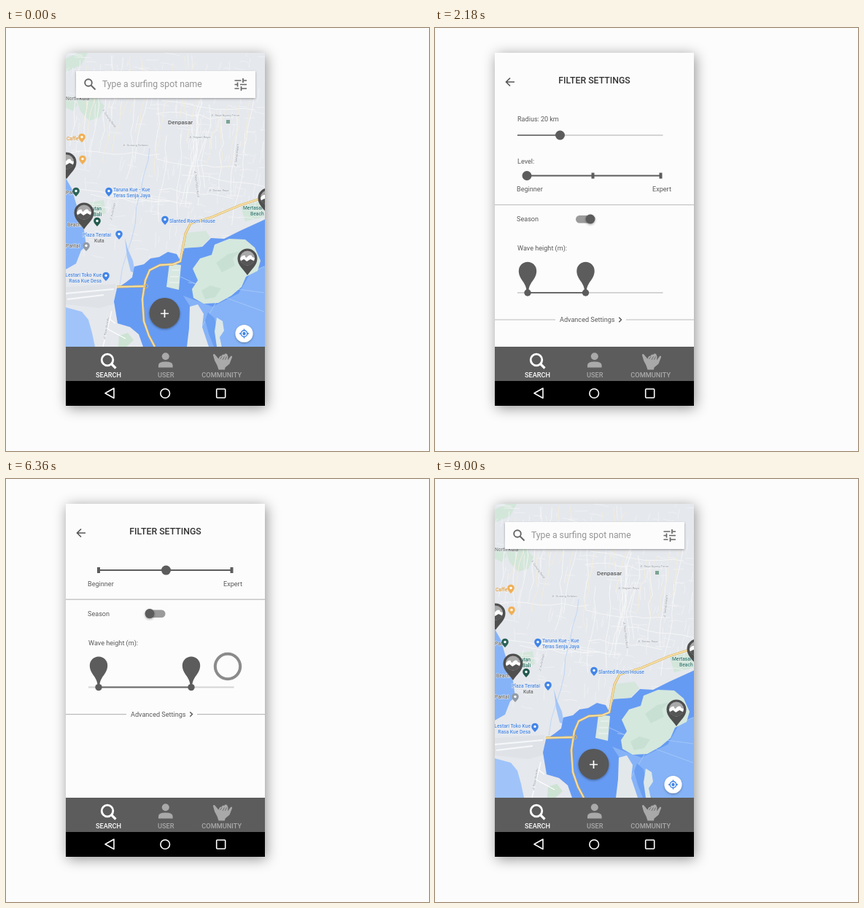
Recreate the animation shown at these times as an HTML page. Size 580 by 580 pixels, loop 10000 ms.

```html
<!DOCTYPE html>
<html lang="en">
<head>
<meta charset="utf-8">
<title>Surf spot filter</title>
<style>
  html, body { margin: 0; width: 100%; height: 100%; overflow: hidden; background: #fcfcfc; }
  body { position: relative; font-family: Roboto, sans-serif; }
  svg { display: block; position: absolute; left: 0; top: 0; }
  text { font-family: Roboto, sans-serif; }
  .phone { position: absolute; left: 82px; top: 34px; width: 272.5px; height: 484px;
    background: #000; box-shadow: 2px 3px 17px rgba(0, 0, 0, .42); }
  .view { position: absolute; left: 0; top: 0; width: 272.5px; height: 403px; overflow: hidden; }
  #panel { position: absolute; left: 0; top: 0; width: 272.5px; height: 484px;
    background: #fcfcfc; transform-origin: 136.25px 252px; }
  .label { font-size: 9.1px; fill: #5a5a5a; }
  .poi { font-size: 6.7px; font-weight: 500; fill: #4c89e2; }
  .place { font-size: 6.7px; font-weight: 500; fill: #666; }
  .street { font-size: 4.2px; fill: #9a9da2; }
  .halo text { paint-order: stroke; stroke: #eef1f5; stroke-width: 1.2px; }
  .nav { font-size: 9.2px; font-weight: 500; text-anchor: middle; }
</style>
</head>
<body>
<div class="phone">
  <div class="view">
    <svg id="map" width="272.5" height="403" viewBox="82 34 272.5 403">
      <defs>
        <filter id="soft" x="-20%" y="-40%" width="140%" height="190%">
          <feDropShadow dx="0" dy="1.2" stdDeviation="1.6" flood-opacity=".35"/>
        </filter>
        <g id="spot">
          <path d="M-13.500 -23a13.500 13.500 0 1 1 27 0C13.500 -13 5 -8 0 0C-5 -8 -13.500 -13 -13.500 -23z" fill="#4f4f4f"/>
          <circle cy="-23.500" r="10" fill="#a9a9a9"/>
          <path d="M-10 -23q3-5 7-4q-1 2 2 3q3-5 7-3q-1 2 4 3q-1 9-10 10.500q-9-1.500-10-9.500z" fill="#fff"/>
          <path d="M-9.300 -19.500l4.500-2.500 4 3 5-3 5 2.500q-3 6-9.200 6.200q-6.300-.2-9.300-6.200z" fill="#565656"/>
        </g>
      </defs>
      <rect x="82" y="34" width="273" height="403" fill="#e5e8ed"/>
      <g fill="#d3e6da">
        <path d="M82 42l16-8h14l-9 17-21 9zM97 98l28-3 10 12-7 16-14 4-12-13zM82 94h8l8 11-6 9-10-5z"/>
        <path d="M110 240l24-4 3 18-20 6zM322 245l32-9v23l-26 6z"/>
      </g>
      <g id="roads" fill="none"></g>
      <path d="M82 355l68-4v27l-22 6-46-5z" fill="#dfe3e8"/>
      <path d="M82 364l66-6M84 372l50-6" stroke="#f6f7f9" stroke-width="2"/>
      <path d="M82 206l8 14 8 27 9 30 3 22-7 6-7 18-14 8z" fill="#86b3f7"/>
      <path d="M82 383l22 6 9 11 5 18 4 19H82z" fill="#a0c4fa"/>
      <path d="M163 288l4 15 7 16 3 17-6-2-5-20z" fill="#a3c5f8"/>
      <path d="M148 375l4-18 12-8 9-7 3-15 13-3 9-8 12-2 12-7 12 3 5 9 6-18 24-1 12-12 18 1 22-11 35-16v175H188l-6-17-12-10-17-5z" fill="#669bf3"/>
      <path d="M243 367l40 15 36-18 16-28 20-10v111h-79l-20-50z" fill="#86b3f7"/>
      <path d="M239 341l60 28 55 20M250 349l104 14M253 437l50-87 51-23" fill="none" stroke="#a9caf9" stroke-width=".8"/>
      <path d="M247 281l27-3 6 9-12 13-24 2z" fill="#d5e6dc"/>
      <path d="M256 330l10-14 16-5 4-14 20-8 22 1 13 11 8 18-4 14-16 8-6 14-14 12-18 10-20 1-14-8-2-12 8-12z" fill="#d5e8de"/>
      <path d="M288 322l16-12 17-4-10 10 3 10-18 9zM268 360l12-7 15 4-8 12-14 3z" fill="#c6dfd2" opacity=".8"/>
      <path d="M224 323l16 2-3 34-17-4z" fill="#d8e8e1"/>
      <path d="M227 332h11M225 341h12M224 349h13" stroke="#f1f5f3"/>
      <path d="M252 382l11-3 8 13-2 18 9 27h-30l3-25z" fill="#e3e8eb"/>
      <path d="M277 390l9 8 4 20 7 19h-12l-7-18-5-18z" fill="#6a9ff1"/>
      <path d="M289 397l8 5 2 13-6 9 3 13h-7l-3-21z" fill="#dbe7e9"/>
      <path d="M155 422l12-4 8 10-10 9h-11z" fill="#cde3d3"/>
      <path d="M133 437l12-49M138 412l26 14M142 399l8 6" stroke="#fff" stroke-width="1.2" fill="none"/>
      <g fill="none" stroke-linejoin="round">
        <path id="highway" d="M355 232l-34 11-24 10-14 6-30 9-7 14-7 38-10 4-18 1-14 7-6 14-4 26 2 30 7 20 8 15M152 355l39-1" stroke="#dcb766" stroke-width="2.800"/>
        <use href="#highway" style="stroke:#fbe6b0;stroke-width:1.4"/>
      </g>
      <path d="M355 232l-34 11-24 10-14 6-30 9-7 14-7 38-10 4-18 1-14 7-6 14-4 26 2 30 7 20 8 15M152 355l39-1" fill="none" stroke="#fbe6b0" stroke-width="1.400"/>
      <circle cx="192" cy="354" r="2.600" fill="none" stroke="#e0b258"/>
      <g class="halo">
        <text x="222" y="132" font-size="8" font-weight="500" fill="#555">Denpasar</text>
        <g class="poi">
          <text x="147" y="224">Taruna Kue - Kue</text><text x="147" y="232">Teras Senja Jaya</text>
          <text x="224" y="267">Slanted Room House</text>
          <text x="105" y="286">Plaza Teratai</text>
          <text x="131" y="341" text-anchor="end">Lestari Toko Kue</text>
          <text x="131" y="349" text-anchor="end">Rasa Kue Desa</text>
        </g>
        <g class="place">
          <text x="82" y="99" font-weight="400">North Kuta</text>
          <text x="121" y="294">Kuta</text>
          <text x="113" y="250" fill="#2d7866">Hutan</text><text x="120" y="258" fill="#2d7866">Bali</text>
          <text x="84" y="272">Beach</text><text x="82" y="301">Pantai</text><text x="82" y="228">Park</text>
          <text x="325" y="249" fill="#2d7866">Mertasari</text><text x="335" y="257" fill="#2d7866">Beach</text>
          <text x="83" y="154" fill="#e29a35">Caffe</text>
        </g>
        <g class="street">
          <text x="281" y="121">Jl. Raya Agung Timur</text>
          <text x="160" y="162">Jl. Gunung Selatan</text><text x="251" y="151">Jl. Hayam Raya</text>
          <text x="278" y="224">Jl. Danau Raya</text>
          <text transform="translate(316 190)rotate(-84)">Jl. Sedap Malam</text>
          <text transform="translate(258 196)rotate(83)">Jl. Raya Pulau Kecil</text>
          <text transform="translate(131 112)rotate(54)">Jl. Gunung Barat</text>
          <text transform="translate(136 427)rotate(-80)">Jl. Raya Uluwatu</text>
          <text transform="translate(145 264)rotate(-78)">Jl. Kuta Raya</text>
        </g>
      </g>
      <g id="places"></g>
      <rect x="302" y="126" width="5" height="5" fill="#7ba492"/>
      <use href="#spot" x="331" y="339"/><use href="#spot" x="107" y="276"/>
      <use href="#spot" x="83" y="207"/><use href="#spot" x="359" y="256"/>
      <circle cx="217.500" cy="391" r="21" fill="#585858" filter="url(#soft)"/>
      <path d="M212 391.500h11M217.500 386v11" stroke="#fff" stroke-width="1.700"/>
      <circle cx="326.500" cy="419" r="12" fill="#fff" filter="url(#soft)"/>
      <g fill="none" stroke="#4285e8" stroke-width="1.400">
        <circle cx="326.500" cy="419" r="4.300"/><circle cx="326.500" cy="419" r="1.500" fill="#4285e8"/>
        <path d="M326.500 412.500v2.500M326.500 423v2.500M320 419h2.500M330.500 419h2.500"/>
      </g>
      <rect x="96" y="59" width="246" height="37" fill="#fcfcfc" filter="url(#soft)"/>
      <g fill="none" stroke="#666" stroke-width="1.900">
        <circle cx="113" cy="75" r="4.800"/><path d="M116.500 78.500l6 6"/>
        <path stroke-width="1.700" d="M313.500 72h9M326 72h4M313.500 77.500h4M321 77.500h9M313.500 83h6M323 83h7M325 69v6M317.500 74.500v6M322.500 80v6"/>
      </g>
      <text x="132" y="81" font-size="12.200" fill="#949494">Type a surfing spot name</text>
      <rect id="dim" x="82" y="34" width="273" height="403"/>
    </svg>
    <div id="panel">
      <svg width="272.5" height="484" viewBox="82 34 272.5 484">
        <defs>
          <clipPath id="body"><rect x="82" y="110" width="273" height="408"/></clipPath>
          <g id="drop" fill="#5c5c5c">
            <path d="M-12.200-30a12.200 12.200 0 1 1 24.400 0C12.200-18 2-15 1.300-2h-2.600C-2-15-12.200-18-12.200-30z"/>
            <circle r="4.700"/>
          </g>
        </defs>
        <path d="M109 74h-11M103 68.500l-5.500 5.500 5.500 5.500" fill="none" stroke="#555" stroke-width="1.600"/>
        <text x="218.500" y="76" font-size="12.300" font-weight="500" fill="#333" text-anchor="middle">FILTER SETTINGS</text>
        <g clip-path="url(#body)"><g id="content">
          <g class="label">
            <text x="113" y="127.500">Radius:</text>
            <text id="km" x="145" y="127.500"></text><text x="157.200" y="127.500">km</text>
            <text x="113" y="186">Level:</text>
            <text x="112" y="224">Beginner</text><text x="298" y="224">Expert</text>
            <text x="112" y="265">Season</text>
            <text x="113" y="305">Wave height (m):</text>
            <text x="171" y="403">Advanced Settings</text>
          </g>
          <g stroke-width="2">
            <path d="M113 147h199.500M113 363h199.500" stroke="#d4d4d4"/>
            <line id="radiusLine" x1="113" y1="147" y2="147" stroke="#7c7c7c"/>
            <line id="waveLine" x1="127" y1="363" y2="363" stroke="#6a6a6a"/>
            <path d="M126 202.500h184" stroke="#5c5c5c"/>
          </g>
          <path d="M125 198.500h4v8h-4zM214.500 198.500h4v8h-4zM307.500 198.500h4v8h-4z" fill="#5c5c5c"/>
          <path d="M82 242.500h273M82 400h83M262 400h93" stroke="#bcbcbc" stroke-width="1.200"/>
          <circle id="radiusKnob" cy="147" r="6.500" fill="#5c5c5c"/>
          <circle id="levelKnob" cy="202.500" r="6.500" fill="#5c5c5c"/>
          <rect x="193" y="257" width="25.500" height="10.500" rx="5.200" fill="#9b9b9b"/>
          <circle id="season" cy="262" r="6.500" fill="#5c5c5c" filter="url(#soft)"/>
          <use href="#drop" x="127" y="363"/><use id="pin" href="#drop" y="363"/>
          <path id="arrow" d="M252.300 396.800l3.200 3.200-3.200 3.200" fill="none" stroke="#555" stroke-width="1.400"/>
          <g id="more">
            <rect x="112" y="440" width="174" height="24.500" rx="1.500" fill="#fff" filter="url(#soft)"/>
            <text x="120.500" y="456" font-size="10" font-weight="500" fill="#4a4a4a" letter-spacing=".1">Beachbreak</text>
            <path d="M268.700 451.800l3.200 3.200 3.200-3.200" fill="none" stroke="#444" stroke-width="1.500"/>
            <text class="label" x="113" y="512.500">Only Onshore Swell</text>
            <rect x="212" y="504.500" width="25" height="10.500" rx="5.200" fill="#9b9b9b"/>
            <circle cx="216.500" cy="509.700" r="6.500" fill="#5c5c5c" filter="url(#soft)"/>
            <text class="label" x="113" y="551.500">Tide:</text>
          </g>
        </g></g>
      </svg>
    </div>
    <svg width="272.5" height="403" viewBox="82 34 272.5 403">
      <path id="tap" fill="#5c5c5c" fill-rule="evenodd"/>
    </svg>
  </div>
  <svg width="272.5" height="484" viewBox="82 34 272.5 484">
    <rect x="82" y="437" width="273" height="47" fill="#5c5c5c"/>
    <rect x="82" y="484" width="273" height="35"/>
    <circle cx="139" cy="455" r="7.800" fill="none" stroke="#fff" stroke-width="2.800"/>
    <path d="M144.500 460.500l6 6" stroke="#fff" stroke-width="3.200"/>
    <g fill="#a9a9a9">
      <circle cx="218.800" cy="450.300" r="5"/>
      <path d="M209 465.500v-3q0-5 9.800-5t9.800 5v3z"/>
      <path d="M283.800 448q1.500-2 3 0l4.500 5.500 2-3.500 2.500-.5 1-1.800 2.600 0 1-1.200 2.600.3 1.600 4-.6 4.700 4-5.500q2-1.500 2.200 1l-3.700 9.500-6 5-.5 3h-8.500l-2-6q-4-6-5.700-14.500z"/>
    </g>
    <path d="M293.500 454l2.500-3.500M297 455l2.500-4.500M300.500 455l2-4.500" stroke="#5c5c5c" stroke-width=".8"/>
    <g class="nav" fill="#a9a9a9">
      <text x="140.500" y="479" fill="#fff">SEARCH</text>
      <text x="219.300" y="479">USER</text>
      <text x="295.700" y="479">COMMUNITY</text>
    </g>
    <g fill="none" stroke="#fff" stroke-width="1.600" stroke-linejoin="round">
      <path d="M148 494v13.500l-12-6.700z"/><circle cx="218.200" cy="501" r="6.300"/>
      <rect x="288.700" y="495" width="12" height="12" rx="1"/>
    </g>
  </svg>
</div>
<script>
const el = id => document.getElementById(id);
const set = (id, attrs) => { for (const k in attrs) el(id).setAttribute(k, attrs[k]); };
const mix = (a, b, p) => a + (b - a) * p;
const ramp = (t, a, b) => Math.min(1, Math.max(0, (t - a) / (b - a)));
const easeOut = p => 1 - (1 - p) ** 3;
const easeInOut = p => (1 - Math.cos(Math.PI * p)) / 2;

let seed = 11;
const rnd = () => (seed = seed * 16807 % 2147483647) / 2147483647;

// Street net: wandering main roads plus short side streets
function road(x, y, dx, dy, n, wander, color, width) {
  let d = `M${x} ${y}`;
  for (let i = 0; i < n; i++)
    d += `l${(dx + (rnd() - .5) * wander).toFixed(1)} ${(dy + (rnd() - .5) * wander).toFixed(1)}`;
  return `<path d="${d}" stroke="${color}" stroke-width="${width}"/>`;
}
function drawRoads() {
  let out = '';
  for (let i = 0; i < 300; i++) {
    const len = 3 + rnd() * 8, up = rnd() < .6;
    out += road(82 + rnd() * 272, 34 + rnd() * 280, up ? -1 : len, up ? len : 1, 2, 4, '#f1f3f5', .8);
  }
  for (let i = 0; i < 22; i++)
    out += road(90 + rnd() * 265, 34 + rnd() * 120, -1.5, 16, 7, 9, '#f5f6f6', 1);
  for (let i = 0; i < 14; i++)
    out += road(82 + rnd() * 170, 45 + rnd() * 240, 16, 1.5, 7, 9, '#f5f6f6', 1);
  for (let i = 0; i < 16; i++)
    out += road(110 + i * 15, 36 + rnd() * 90, -2, 14, 6, 9, '#f3edda', 1);
  out += road(197, 165, -4, 20, 9, 6, '#b7d2f6', .8);
  el('roads').innerHTML = out;
}
function drawPlaces() {
  const dots = [[141, 225, '#4285e8'], [218, 264, '#4285e8'], [155, 284, '#4285e8'], [137, 341, '#4285e8'],
    [104, 151, '#f0b057'], [105, 181, '#f0b057'], [96, 225, '#2b6257'], [125, 266, '#22594f'], [110, 300, '#929ba5']];
  el('places').innerHTML = dots.map(([x, y, c]) =>
    `<g transform="translate(${x} ${y})"><path d="M0 6Q-5 1-4.800-1.500a4.800 4.800 0 0 1 9.600 0Q5 1 0 6z" fill="${c}"/><circle cy="-1.500" r="1.700" fill="#fff"/></g>`).join('');
}

// Touches: start, x, y, largest radius
const taps = [[280, 321, 77, 28], [1400, 209, 147, 28], [4160, 218.5, 203.5, 28],
  [5000, 206, 261, 28], [6045, 304, 257, 19.5], [8300, 103, 74, 28]];
const ring = (x, y, r) => `M${x - r} ${y}a${r} ${r} 0 1 0 ${2 * r} 0a${r} ${r} 0 1 0 ${-2 * r} 0z`;

function drawTap(t) {
  const hit = taps.find(([start]) => t >= start && t < start + 360);
  if (!hit) return set('tap', { d: '' });
  const [start, x, y, max] = hit;
  const p = (t - start) / 360, r = max * (1 - (1 - p) ** 2);
  const hole = ramp(p, .42, 1);
  set('tap', { d: ring(x, y, r) + (hole ? ring(x, y, r * hole) : ''), opacity: 1 - .38 * hole });
}

function drawPanel(t) {
  const p = t < 5000 ? ramp(t, 740, 980) : 1 - ramp(t, 8760, 9000), q = 1 - p;
  const panel = el('panel');
  panel.style.opacity = p;
  panel.style.visibility = p ? 'visible' : 'hidden';
  panel.style.transform = q
    ? `perspective(400px) translateZ(${-170 * q}px) rotateX(${32 * q}deg)` : 'none';
  set('dim', { opacity: p });
}

function draw(t) {
  drawPanel(t);
  drawTap(t);
  const back = easeOut(ramp(t, 1860, 2560)), forth = easeInOut(ramp(t, 2860, 3910));
  const radius = mix(mix(208.5, 164.5, back), 250, forth);
  set('radiusKnob', { cx: radius });
  set('radiusLine', { x2: radius });
  el('km').textContent = Math.round(mix(mix(30, 18, back), 46, forth));
  set('levelKnob', { cx: mix(126, 219.5, easeInOut(ramp(t, 4480, 4820))) });
  set('season', { cx: mix(213, 197, easeInOut(ramp(t, 5200, 5420))) });
  const wave = mix(206.5, 254, easeInOut(ramp(t, 5380, 5900)));
  set('pin', { x: wave });
  set('waveLine', { x2: wave });
  set('content', { transform: `translate(0 ${-110.5 * easeOut(ramp(t, 6035, 7020))})` });
  const open = ramp(t, 7220, 7480);
  set('arrow', { transform: `rotate(${90 * open} 253.8 400)` });
  set('more', { opacity: open });
}

function loop() {
  draw(performance.now() % 10000);
  requestAnimationFrame(loop);
}
drawRoads();
drawPlaces();
loop();
</script>
</body>
</html>
```
